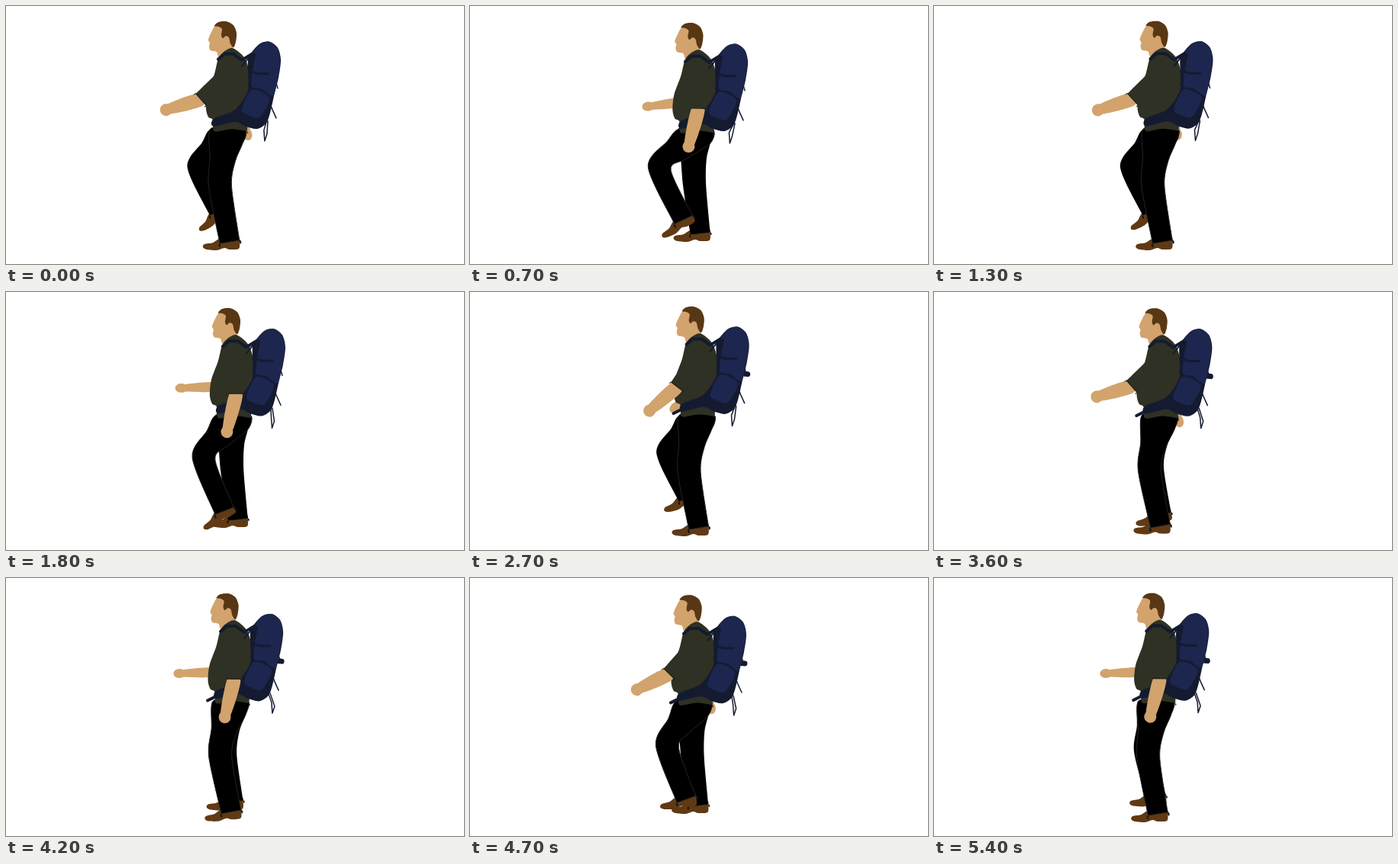
Animation of 600 by 338 pixels, one loop 5500 ms. Source, as an HTML page with a canvas:

```html
<!DOCTYPE html>
<html lang="en">
<head>
<meta charset="utf-8">
<title>Backpacker</title>
<style>
  html, body { margin: 0; width: 100%; height: 100%; overflow: hidden; background: #fff; }
  canvas { display: block; }
</style>
</head>
<body>
<canvas id="stage" width="600" height="338"></canvas>
<script>
const ctx = document.getElementById('stage').getContext('2d');
const LOOP = 5500, STEP = 100, STRIDE = 1250, START = 0.95;
const SKIN = '#d2a36d', HAIR = '#583714', SHIRT = '#2e3123', SEAM = '#1c2019';
const BLUE = '#1d264e', STRAP = '#141b30', SHOE = '#5f3a14', BLACK = '#000';

const wave = turns => Math.cos(2 * Math.PI * turns);
const mix = (a, b, u) => a.map((v, i) => v + (b[i] - v) * u);
function ease(from, to, x) {
  const u = Math.min(1, Math.max(0, (x - from) / (to - from)));
  return u * u * (3 - 2 * u);
}

// Closed smooth curve; a repeated point makes a corner.
function blob(color, points, outline) {
  const n = points.length, p = i => points[(i + n) % n];
  ctx.beginPath();
  ctx.moveTo(...p(0));
  for (let i = 0; i < n; i++) {
    const [a, b, c, d] = [p(i - 1), p(i), p(i + 1), p(i + 2)];
    ctx.bezierCurveTo(b[0] + (c[0] - a[0]) / 7, b[1] + (c[1] - a[1]) / 7,
      c[0] - (d[0] - b[0]) / 7, c[1] - (d[1] - b[1]) / 7, c[0], c[1]);
  }
  ctx.fillStyle = color;
  ctx.fill();
  if (outline) { ctx.strokeStyle = outline; ctx.lineWidth = 1; ctx.stroke(); }
}

function line(color, width, ...points) {
  ctx.beginPath();
  points.forEach(p => ctx.lineTo(...p));
  ctx.strokeStyle = color;
  ctx.lineWidth = width;
  ctx.lineCap = ctx.lineJoin = 'round';
  ctx.stroke();
}

function shifted(x, y, draw, angle = 0) {
  ctx.save();
  ctx.translate(x, y);
  ctx.rotate(angle);
  draw();
  ctx.restore();
}

// Points on both sides of p, at right angles to the direction a -> b.
function sides(p, a, b, half, otherHalf = half) {
  const dx = b[0] - a[0], dy = b[1] - a[1], len = Math.hypot(dx, dy);
  const at = s => [p[0] - dy * s / len, p[1] + dx * s / len];
  return [at(half), at(-otherHalf)];
}

// The leg stands for the first part of its phase, then lifts and comes down.
function drawLeg(hipX, phase, kneeShift, ankleShift, ground, outline) {
  const lift = ease(0.28, 0.44, phase) * (1 - ease(0.6, 0.88, phase));
  const tilt = -1.7 * lift * Math.max(0, 0.8 - phase);
  const hip = [hipX, 167];
  const knee = [hipX + kneeShift - 37 * lift, 236 - 23 * lift];
  const ankle = [hipX + ankleShift - 18 * lift, ground - 29 * lift];
  const [thighFront, thighBack] = sides(mix(hip, knee, 0.5), hip, knee, 18.5, 15);
  const [kneeFront, kneeBack] = sides(knee, hip, ankle, 15.5, 14.5);
  const [cuffFront, cuffBack] = sides(ankle, knee, ankle, 13);
  shifted(...ankle, () => blob(SHOE, [[-11, -5], [-22, 1], [-33, 3], [-35, 7], [-30, 10], [-17, 11],
    [-7, 8], [0, 10], [12, 9], [13, 0], [11, -6]]), tilt);
  blob(BLACK, [[hipX - 23, 162], [hipX, 160], [hipX + 24, 162], [hipX + 20, 180], thighBack, kneeBack,
    cuffBack, cuffBack, cuffFront, cuffFront, kneeFront, thighFront], outline);
}

// 0 when the arm hangs back, 1 when it is held out in front.
const armSwing = phase => 0.5 + 0.5 * Math.tanh(2.5 * wave(phase - 0.89));

function armPose(phase, back, front) {
  const s = armSwing(phase);
  const hand = mix(back.hand, front.hand, s);
  hand[1] += 40 * s * (1 - s);
  return { elbow: mix(back.elbow, front.elbow, s), hand };
}

function drawForearm({ elbow, hand }, top, wrist) {
  const [a, b] = sides(elbow, elbow, hand, top);
  const [c, d] = sides(hand, elbow, hand, wrist);
  blob(SKIN, [a, b, d, c]);
  ctx.beginPath();
  ctx.ellipse(...hand, 8, wrist + 2, Math.atan2(hand[1] - elbow[1], hand[0] - elbow[0]), 0, 7);
  ctx.fill();
}

function drawSleeve(elbow) {
  const shoulder = [297, 86];
  const [a, b] = sides(shoulder, shoulder, elbow, 12);
  const [c, d] = sides(elbow, shoulder, elbow, 10);
  blob(SHIRT, [[299, 75], a, c, c, d, d, b]);
  line(SEAM, 1.3, d, c);
}

function drawHead() {
  blob(SKIN, [[275, 26], [269, 35], [265, 45], [267, 49], [266, 54], [268, 59], [276, 61],
    [279, 68], [290, 66], [298, 54], [297, 38], [286, 26]]);
  blob(HAIR, [[273, 27], [278, 22], [289, 21], [298, 26], [302, 36], [301, 48], [298, 55],
    [294, 50], [292, 42], [288, 40], [284, 43], [282, 39], [283, 31], [279, 28]]);
}

function drawShirt() {
  blob(SHIRT, [[278, 70], [285, 61], [297, 56], [312, 68], [319, 88], [319, 115], [316, 165], [316, 165],
    [295, 162], [273, 165], [271, 150], [265, 146], [262, 135], [264, 115], [273, 90]]);
}

function drawPack(slack, sway) {
  line(STRAP, 1.5, [354, 92], [354, 102], [356, 109]);
  line(STRAP, 1.5, [345, 127], [349, 137], [354, 148]);
  line(STRAP, 1.5, [345, 138], [341, 153], [335 + sway, 164], [336 + sway, 178], [339 + sway, 169], [343, 152]);
  line(STRAP, 7, [348, 109], [346 + slack, 110]);
  blob(STRAP, [[318, 68], [332, 51], [345, 48], [356, 56], [360, 72], [357, 95], [352, 115],
    [343, 151], [330, 162], [314, 159], [300, 153], [272, 159], [272, 149], [300, 137], [317, 112], [317, 86]]);
  blob(BLUE, [[323, 64], [333, 51], [345, 48], [356, 57], [359, 74], [356, 94], [350, 119], [335, 110],
    [322, 107], [321, 88]]);
  blob(BLUE, [[309, 137], [322, 111], [345, 121], [337, 141], [330, 148], [317, 144]]);
  line(STRAP, 3, [321, 87], [330, 90], [343, 90]);
  line(STRAP, 4, [325, 65], [321, 85], [319, 106]);
  line(STRAP, 4, [278, 71], [286, 64], [298, 64], [309, 72], [322, 64]);
  line(STRAP, 2, [322, 64], [309, 80]);
  line(STRAP, 4, [280, 152], [273 - slack, 153 + slack * 0.7]);
}

function draw(now) {
  const t = Math.floor(now % LOOP / STEP) * STEP;
  const phase = (START + t / STRIDE) % 1;
  const drift = 5 * Math.sin(Math.PI * (t / LOOP) ** 0.7);
  const bob = -1.7 * wave(phase - 0.12);
  const slack = 12 * ease(1800, 2700, t);
  const sway = 5 + 5 * wave(2 * phase - 0.58);
  const hipX = 290 + 1.4 * drift;
  const near = armPose(phase, { elbow: [297, 133], hand: [285, 183] }, { elbow: [255, 123], hand: [209, 136] });
  const far = armPose((phase + 0.54) % 1, { elbow: [309, 138], hand: [318, 169] }, { elbow: [269, 124], hand: [224, 125] });

  ctx.fillStyle = '#fff';
  ctx.fillRect(0, 0, 600, 338);
  shifted(drift, bob, () => drawForearm(far, 6, 4));
  drawLeg(hipX, (phase + 0.5) % 1, 0, 7, 298);
  drawLeg(hipX, phase, -9, 3, 309, '#242424');
  shifted(drift, bob, () => {
    drawHead();
    drawShirt();
    shifted(drift * 0.2, bob * 0.4, () => drawPack(slack, sway));
    drawForearm(near, 8.5, 6);
    drawSleeve(near.elbow);
  });
  requestAnimationFrame(() => draw(performance.now() - began));
}

const began = performance.now();
draw(0);
</script>
</body>
</html>
```
